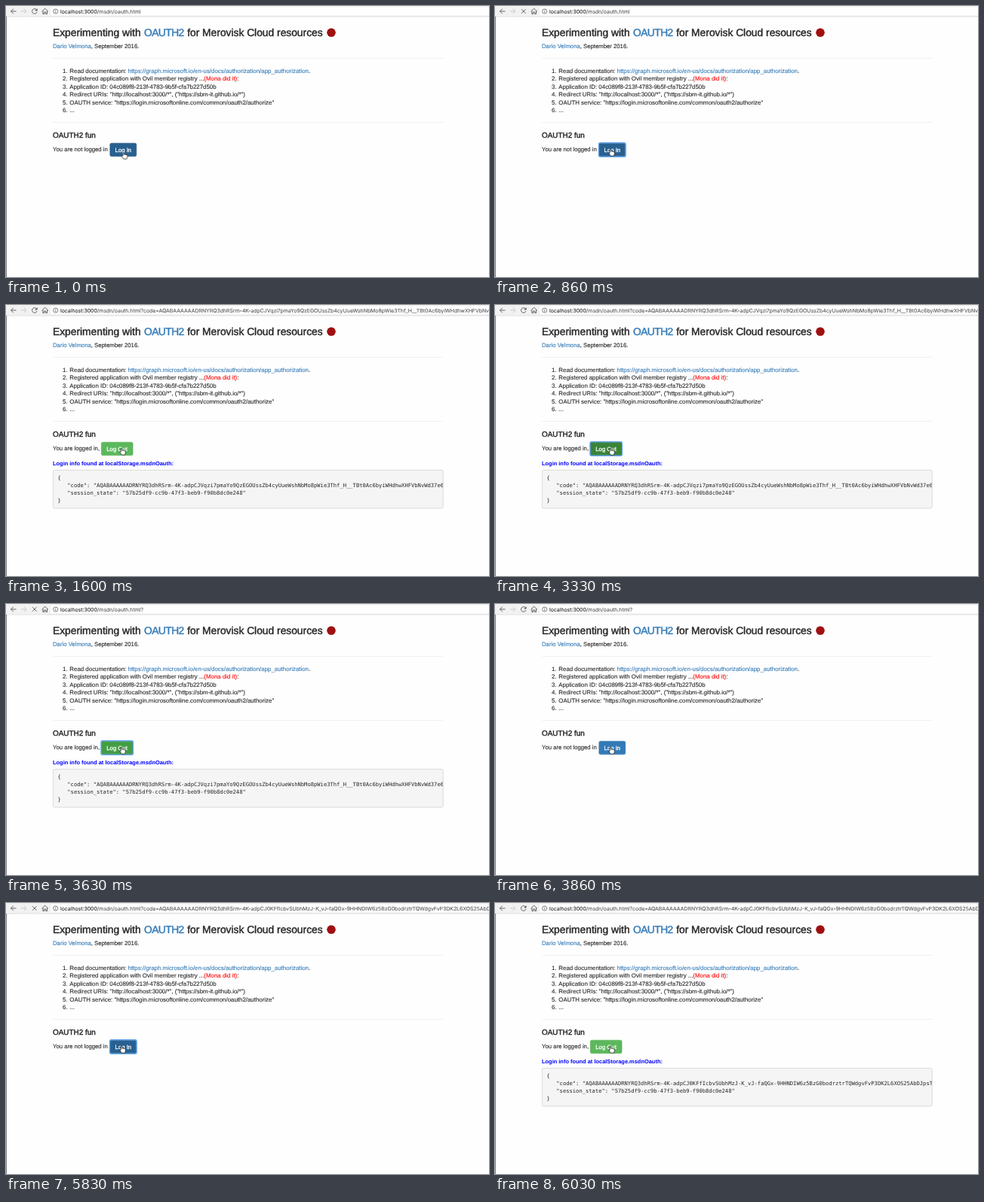
Animation of 640 by 360 pixels, one loop 8 s. Source, as an HTML page:

```html
<!DOCTYPE html>
<html lang="en">
<head>
<meta charset="utf-8">
<title>OAUTH2 login</title>
<style>
html, body { margin: 0; width: 100%; height: 100%; overflow: hidden; background: #fefefe; }
svg { display: block; width: 100vw; height: 100vh; }
text { font: 7.74px "Liberation Sans", Arial, sans-serif; fill: #262626; stroke: #262626; stroke-width: .1px; white-space: pre; text-rendering: geometricPrecision; }
.title { font-size: 13.8px; }
.sub { font-size: 9.95px; }
.title, .sub { stroke-width: .42px; }
.list text { font-size: 7.9px; }
.num { text-anchor: end; }
.link { fill: #337ab7; stroke: #337ab7; }
.title .link { letter-spacing: -.55px; }
.red { fill: #f00; stroke: #f00; }
.note { font-size: 7.45px; font-weight: bold; fill: #00f; stroke: none; }
.mono { font: 7.15px "DejaVu Sans Mono", monospace; stroke: none; }
.url { font: 6.92px Inter, sans-serif; fill: #555; stroke: #555; }
.host { fill: #222; stroke: #222; }
.label { fill: #fff; stroke: #fff; stroke-width: .3px; }
.icon { fill: none; stroke: #555; stroke-width: .9; }
.faint { stroke: #c6c6c6; }
.info { stroke-width: .75; }
.ring { fill: none; stroke: #62a4ea; stroke-width: 1.4; }
.rule { stroke: #f1f1f1; }

/* 1% of the loop is 80 ms */
.anim { animation: 8s step-end infinite; }
.plain { animation-name: plain; }
.first { animation-name: first; }
.query { animation-name: query; }
.second { animation-name: second; }
.busy { animation-name: busy; }
.idle { animation-name: idle; }
.out { animation-name: out; }
.in { animation-name: in; }
.code1 { animation-name: code1; }
.code2 { animation-name: code2; }
.blue { animation-name: blue; }
.green { animation-name: green; }
.blueRing { animation-name: blueRing; }
.greenRing { animation-name: greenRing; }
.hand { animation-name: hand; }

@keyframes first { 0% { opacity: 0 } 16.25% { opacity: 1 } 45.375%, 100% { opacity: 0 } }
@keyframes query { 0% { opacity: 0 } 45.375% { opacity: 1 } 72.875%, 100% { opacity: 0 } }
@keyframes second { 0% { opacity: 0 } 72.875%, 100% { opacity: 1 } }
@keyframes busy {
  0%, 20%, 48.25%, 75.375%, 100% { opacity: 0 }
  10.75%, 44.5%, 68.75% { opacity: 1 }
}
@keyframes idle {
  0%, 20%, 48.25%, 75.375%, 100% { opacity: 1 }
  10.75%, 44.5%, 68.75% { opacity: 0 }
}
@keyframes out { 0%, 47.5% { opacity: 1 } 18.75%, 75%, 100% { opacity: 0 } }
@keyframes in { 0%, 47.5% { opacity: 0 } 18.75%, 75%, 100% { opacity: 1 } }
@keyframes code1 { 0% { opacity: 1 } 60%, 100% { opacity: 0 } }
@keyframes code2 { 0% { opacity: 0 } 60%, 100% { opacity: 1 } }
@keyframes blue {
  0%, 10%, 68.25%, 100% { fill: #286090; stroke: #204d74 }
  9.125%, 66.25% { fill: #204d74; stroke: #122b40 }
  47.5% { fill: #337ab7; stroke: #2e6da4 }
}
@keyframes green {
  0%, 47.5%, 100% { fill: #5cb85c; stroke: #4cae4c }
  41.625% { fill: #398439; stroke: #255625 }
  43.75% { fill: #449d44; stroke: #398439 }
}
@keyframes blueRing { 0%, 18.75%, 75%, 100% { opacity: 0 } 9.125%, 66.25% { opacity: 1 } }
@keyframes greenRing { 0%, 47.5%, 100% { opacity: 0 } 41.625% { opacity: 1 } }
@keyframes hand {
  0% { transform: translate(2.5px, 4px) }
  .375% { transform: translate(2px, 3px) }
  1.25% { transform: translate(1.3px, 2px) }
  1.625% { transform: translate(.6px, 1px) }
  2.5%, 100% { transform: none }
}
</style>
</head>
<body>
<svg viewBox="0 0 640 360">
  <defs><clipPath id="box"><rect x="62" y="219" width="517" height="52"/></clipPath></defs>
  <rect width="640" height="360" fill="#fefefe"/>

  <!-- toolbar -->
  <rect width="640" height="14" fill="#f2f2f2"/>
  <rect x="58.5" y="1" width="590" height="12" rx="1.5" fill="#fff" stroke="#e0e0e0" stroke-width=".5"/>
  <path d="M0 14.2H640" stroke="#cfcfcf" stroke-width=".6"/>
  <path d="M.4 14V360" stroke="#4c4c58" stroke-width=".8"/>
  <path class="icon" d="M13.5 7H6.5M9.8 3.7L6.5 7L9.8 10.3"/>
  <path class="icon faint" d="M20 7H27M23.7 3.7L27 7L23.7 10.3"/>
  <g class="anim idle">
    <path class="icon" d="M40.6 5.2A3.3 3.3 0 1 0 41 8"/>
    <path d="M41.6 3.2V6.6H38.2Z" fill="#555"/>
  </g>
  <path class="icon anim busy" d="M35 4.2L40.6 9.8M40.6 4.2L35 9.8"/>
  <path class="icon" d="M47.5 7.3L51.7 3.3L55.9 7.3M48.9 6.6V10.6H50.7V8H52.7V10.6H54.5V6.6"/>
  <circle class="icon info" cx="65.7" cy="7.1" r="3.1"/>
  <path class="icon info" d="M65.7 6.6V9M65.7 5V5.8"/>
  <text class="url" x="72" y="9.6"><tspan class="host">localhost:3000</tspan>/msdn/oauth.html</text>
  <g id="queries"></g>

  <!-- page -->
  <text class="title" y="39.8"><tspan x="62">Experimenting with</tspan><tspan class="link" x="183">OAUTH2</tspan><tspan x="240.2">for Merovisk Cloud resources</tspan></text>
  <circle cx="431" cy="35.3" r="5.8" fill="#a01010"/>
  <text x="62" y="55.5"><tspan class="link">Dario Velmona</tspan>, September 2016.</text>
  <path class="rule" d="M62 69.5H579M62 154.5H579"/>
  <g class="list">
    <text y="88.8"><tspan x="84.3">Read documentation: </tspan><tspan class="link">https://graph.microsoft.io/en-us/docs/authorization/app_authorization</tspan>.</text>
    <text y="99.2"><tspan x="84.3">Registered application with Ovil member registry ...</tspan><tspan class="red">(Mona did it)</tspan>:</text>
    <text x="84.3" y="109.7">Application ID: 04c089f8-213f-4783-9b5f-cfa7b227d50b</text>
    <text x="84.3" y="120.1">Redirect URIs: "http://localhost:3000/*", ("https://sbm-it.github.io/*")</text>
    <text x="84.3" y="130.6">OAUTH service: "https://login.microsoftonline.com/common/oauth2/authorize"</text>
    <text x="84.3" y="141">...</text>
    <g id="numbers"></g>
  </g>
  <text class="sub" x="62" y="175">OAUTH2 fun</text>

  <g class="anim out">
    <text x="62" y="193.2">You are not logged in</text>
    <rect class="anim blue" x="137.8" y="182.2" width="35" height="17.6" rx="2" stroke-width=".5"/>
    <rect class="ring anim blueRing" x="137.5" y="181.7" width="35.6" height="18.6" rx="2"/>
    <text class="label" x="144.6" y="193.9">Log In</text>
  </g>

  <g class="anim in">
    <text x="62" y="193.2">You are logged in,</text>
    <rect class="anim green" x="126.3" y="182.2" width="41.8" height="17.6" rx="2" stroke-width=".5"/>
    <rect class="ring anim greenRing" x="126" y="181.7" width="42.4" height="18.6" rx="2"/>
    <text class="label" x="133.3" y="193.9">Log Out</text>
    <text class="note" x="62" y="212.5">Login info found at localStorage.msdnOauth:</text>
    <rect x="62.4" y="219.4" width="516.8" height="50.6" rx="2.2" fill="#f5f5f5" stroke="#ccc" stroke-width=".7"/>
    <g clip-path="url(#box)">
      <text class="mono" x="68.4" y="231.6">{</text>
      <g id="codes"></g>
      <text class="mono" x="68.4" y="251.6">   "session_state": "57b25df9-cc9b-47f3-beb9-f90b8dc0e248"</text>
      <text class="mono" x="68.4" y="261.6">}</text>
    </g>
  </g>

  <path class="anim hand" fill="#fff" stroke="#111" stroke-width=".7" stroke-linejoin="round"
    d="M152.2 195V190.7Q153 189.5 153.8 190.7V193.3Q154.7 192.6 155.4 193.5Q156.3 192.9 156.9 193.8Q158.2 193.4 158.4 194.8V196.4L157.5 199.2H153.3L151 196Q150.6 194.6 152.2 195Z"/>
</svg>
<script>
const svgNS = "http://www.w3.org/2000/svg";
const prefix = "AQABAAAAAADRNYRQ3dhRSrm-4K-adpCJ";
const codes = [
  prefix + "Vqzi7pmaYo9QzEGOUssZb4cyUueWshNbMo8pWie3Thf_H__TBt0Ac6byiWHdhwXHFVbNvWd37e6",
  prefix + "0KFfIcbvSUbhMzJ-K_vJ-faQGx-9HHNDIW6z5BzG0bodrztrTQWdgvFvP3DK2L6XOS25AbDJpsT"
];

function addText(parent, className, x, y, content) {
  const node = document.createElementNS(svgNS, "text");
  node.setAttribute("class", className);
  node.setAttribute("x", x);
  node.setAttribute("y", y);
  node.textContent = content;
  document.getElementById(parent).append(node);
}

const address = document.querySelector(".url");
const queryX = 72 + address.getComputedTextLength();
addText("queries", "url anim query", queryX, 9.6, "?");
["first", "second"].forEach((name, i) => {
  addText("queries", "url anim " + name, queryX, 9.6, "?code=" + codes[i]);
  addText("codes", "mono anim code" + (i + 1), 68.4, 241.8, `   "code": "${codes[i]}",`);
});
for (let i = 0; i < 6; i++) addText("numbers", "num", 81.6, 88.8 + i * 10.44, i + 1 + ".");
</script>
</body>
</html>
```
